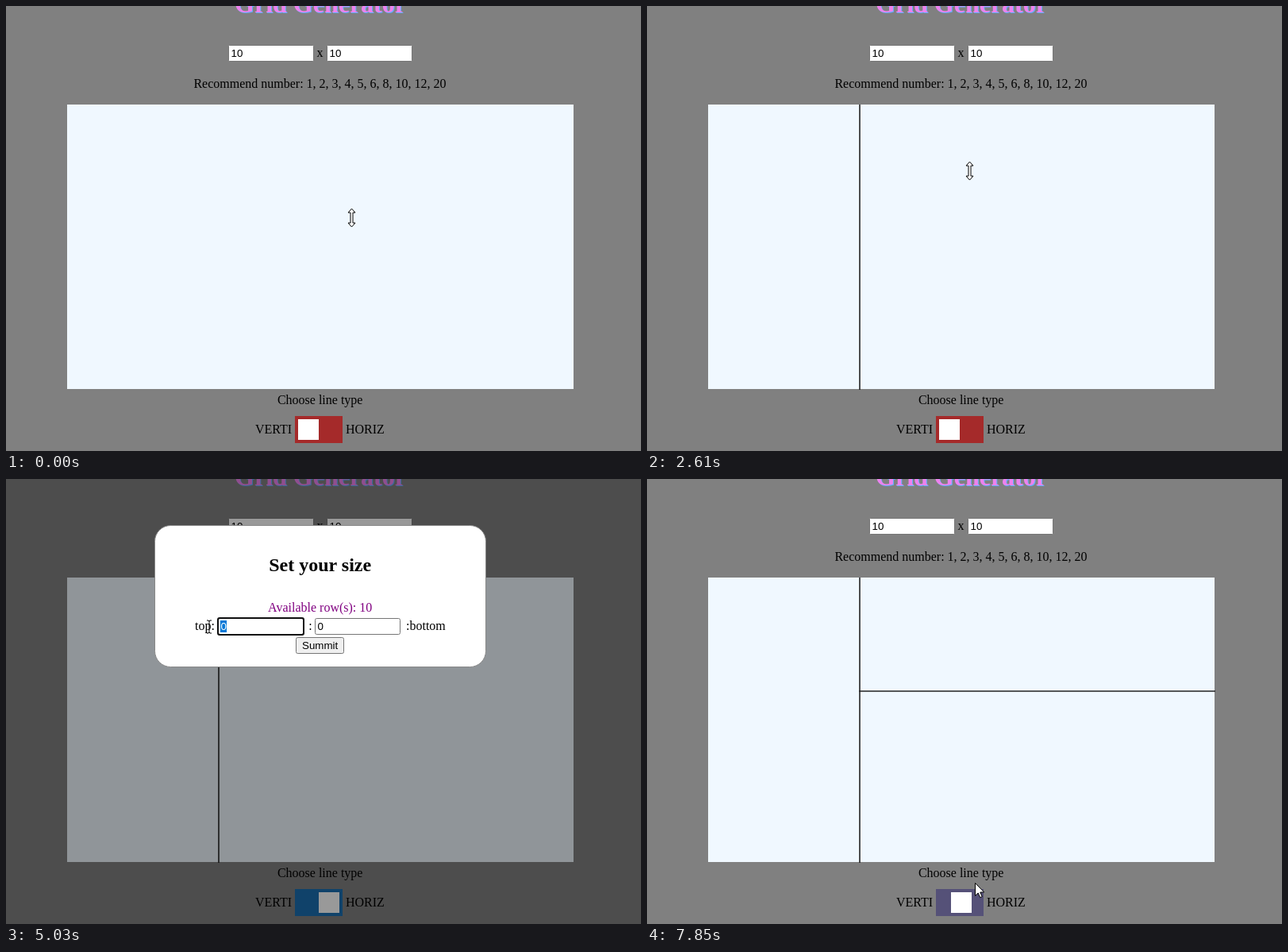
Animation, 800 px wide and 560 px high, one loop 8 s. Source, as an HTML page:

```html
<!DOCTYPE html>
<html lang="en">
<head>
<meta charset="utf-8">
<title>Grid Generator</title>
<style>
  html, body { margin: 0; width: 100%; height: 100%; overflow: hidden; background: #808080; }
  svg { display: block; }
  text { font: 16px "Liberation Serif", "Times New Roman", serif; white-space: pre; }
  .mid { text-anchor: middle; }
  .ui { font: 13.333px "Liberation Sans", Arial, sans-serif; }
  .title { font-size: 32px; font-weight: bold; }
  .head { font-size: 24px; font-weight: bold; }
  .box { fill: #fff; stroke: #767676; }
</style>
</head>
<body>
<svg width="800" height="560" viewBox="0 0 800 560">
  <rect width="800" height="560" fill="#808080"/>
  <text class="title mid" x="397" y="9" fill="#5fb0ff">Grid Generator</text>
  <text class="title mid" x="396" y="8" fill="#ee82ee">Grid Generator</text>
  <rect class="box" x="280.5" y="49.5" width="107" height="20" rx="1"/>
  <rect class="box" x="404.5" y="49.5" width="107" height="20" rx="1"/>
  <text class="ui" x="283.5" y="64">10</text>
  <text class="ui" x="407.5" y="64">10</text>
  <text x="391.5" y="64">x</text>
  <text class="mid" x="395.5" y="103">Recommend number: 1, 2, 3, 4, 5, 6, 8, 10, 12, 20</text>
  <rect x="77" y="124" width="638" height="358" fill="#f0f8ff"/>
  <path id="colLine" d="M268 124V483" stroke="#222" stroke-width="1.6"/>
  <path id="rowLine" d="M267 267H716" stroke="#222" stroke-width="1.6"/>
  <text class="mid" x="395.7" y="501">Choose line type</text>
  <text x="314" y="538">VERTI</text>
  <text x="428" y="538">HORIZ</text>
  <rect id="track" x="364" y="516" width="60" height="34"/>
  <rect id="knob" y="520" width="26" height="26" fill="#fff"/>

  <g id="modal">
    <rect width="800" height="560" fill="#000" fill-opacity=".4"/>
    <rect x="187.5" y="58.5" width="417" height="178" rx="20" fill="#fff" stroke="#888"/>
    <text class="head mid" x="395.7" y="116">Set your size</text>
    <text class="mid" id="avail" x="395.7" y="167" fill="#800080"></text>
    <g id="fields">
      <text id="before" y="190"></text>
      <text x="389.3" y="190">:</text>
      <text id="after" x="512" y="190"></text>
      <g class="field" transform="translate(275 175)"></g>
      <g class="field" transform="translate(397 175)"></g>
    </g>
    <rect id="button" x="365.5" y="199.5" width="60" height="20" rx="2"/>
    <text class="ui" x="373" y="214">Summit</text>
  </g>

  <g id="cursor">
    <circle id="halo" r="11" fill="#ff0" fill-opacity=".6"/>
    <path id="shape" stroke="#000"/>
  </g>
</svg>
<script>
const LOOP = 8000, LAST = 39;
const $ = id => document.getElementById(id);
const set = (el, attrs) => { for (const k in attrs) el.setAttribute(k, attrs[k]); };
const show = (el, on) => el.setAttribute('visibility', on ? 'visible' : 'hidden');
const within = (v, a, b) => v >= a && v <= b;

const RESIZE = 'M0-11.5L4.5-6.5H1.5V6.5H4.5L0 11.5L-4.5 6.5H-1.5V-6.5H-4.5Z';
const SHAPES = {
  arrow: 'M.5.5V16.5L4.2 13L6.7 18.7L9.2 17.6L6.8 12H11.7Z',
  beam: 'M-3-8H-1L0-7L1-8H3M0-7V7M-3 8H-1L0 7L1 8H3',
  ns: RESIZE,
  ew: RESIZE
};

// Pointer path: step, x, y
const PATH = [
  [0, 435.5, 266.5], [1, 382, 260], [3, 382, 260], [6, 330, 226], [7, 254, 186],
  [8, 258, 186], [9, 300, 190], [10, 370, 200], [11, 406.5, 207.5], [13, 406.5, 207.5],
  [14, 403, 290], [16, 395, 533], [17, 395, 533], [18, 430, 440], [20, 485, 306],
  [21, 485, 306], [24, 357, 234], [25, 256, 186], [26, 260, 186], [29, 394, 213],
  [34, 394, 213], [35, 398, 255], [36, 405, 383], [37, 397, 540], [38, 397, 540], [39, 413, 508]
];
const CLICKS = [1, 11, 16, 20, 30, 38];

const startOf = i => 200 * i + 10 * Math.max(0, Math.floor((i - 1) / 7));

function stepAt(t) {
  let i = Math.min(LAST, Math.floor(t / 200));
  while (i > 0 && startOf(i) > t) i--;
  return i;
}

function pointer(step) {
  const n = PATH.findIndex(p => p[0] >= step);
  const b = PATH[n], a = PATH[n - 1] || b;
  const f = b === a ? 0 : (step - a[0]) / (b[0] - a[0]);
  return [a[1] + (b[1] - a[1]) * f, a[2] + (b[2] - a[2]) * f];
}

function cursorKind(step, x, y, open, rows) {
  if (open && step !== 12) return within(y, 175, 191) && x < 383 ? 'beam' : 'arrow';
  if (within(x, 77, 715) && within(y, 124, 482)) return rows ? 'ew' : 'ns';
  return 'arrow';
}

// 0 = vertical, 1 = horizontal
function toggleAt(step) {
  if (step < 17) return 0;
  if (step === 17) return 0.8;
  return step < LAST ? 1 : 0.577;
}

function drawField(el, value, focused, selected) {
  el.innerHTML =
    `<rect class="box" x=".5" y=".5" width="107" height="20" rx="2"/>` +
    (focused ? `<rect width="108" height="21" rx="2" fill="none" stroke="#101010" stroke-width="2"/>` : '') +
    (selected ? `<rect x="3" y="3" width="8" height="15" fill="#0078d7"/>` : '') +
    `<text class="ui" x="3.5" y="15" fill="${selected ? '#fff' : '#000'}">${value}</text>`;
}

function drawModal(step, rows) {
  const from = rows ? 25 : 7;
  const k = step - from;
  const values = rows ? [4, 6] : [3, 7];
  const leave = rows ? 5 : 4;
  $('avail').textContent = `Available ${rows ? 'row' : 'column'}(s): 10`;
  $('before').textContent = rows ? 'top:' : 'left:';
  $('before').setAttribute('x', rows ? 246 : 245);
  $('after').textContent = rows ? ':bottom' : ':right';
  $('fields').setAttribute('transform', `translate(${rows ? -8 : 0} 0)`);
  const [first, second] = document.querySelectorAll('.field');
  drawField(first, k >= 1 ? values[0] : 0, k === 0 || k === 1, k === 0);
  drawField(second, k >= 3 ? values[1] : 0, k >= 2 && k < leave, k === 2);
  const hover = k >= 4;
  set($('button'), { fill: hover ? '#f5f5f5' : '#efefef', stroke: hover ? '#8d8d8d' : '#767676' });
}

function draw(step) {
  const rows = step >= 17;
  const open = within(step, 2, 12) || within(step, 21, 30);
  const on = toggleAt(step);
  const mix = (a, b) => Math.round(a + (b - a) * on);
  show($('colLine'), step >= 13);
  show($('rowLine'), step >= 31);
  $('track').setAttribute('fill', `rgb(${mix(165, 27)},${mix(42, 110)},${mix(42, 177)})`);
  $('knob').setAttribute('x', 368 + 26 * on);
  $('modal').style.display = open ? '' : 'none';
  if (open) drawModal(step, rows);

  const [x, y] = pointer(step);
  const kind = cursorKind(step, x, y, open, rows);
  $('cursor').setAttribute('transform', `translate(${x} ${y})`);
  show($('halo'), CLICKS.includes(step));
  set($('shape'), {
    d: SHAPES[kind],
    fill: kind === 'beam' ? 'none' : '#fff',
    transform: `rotate(${kind === 'ew' ? 90 : 0})`
  });
}

let shown = -1;
function tick() {
  const step = stepAt(performance.now() % LOOP);
  if (step !== shown) draw(shown = step);
  requestAnimationFrame(tick);
}
tick();
</script>
</body>
</html>
```
